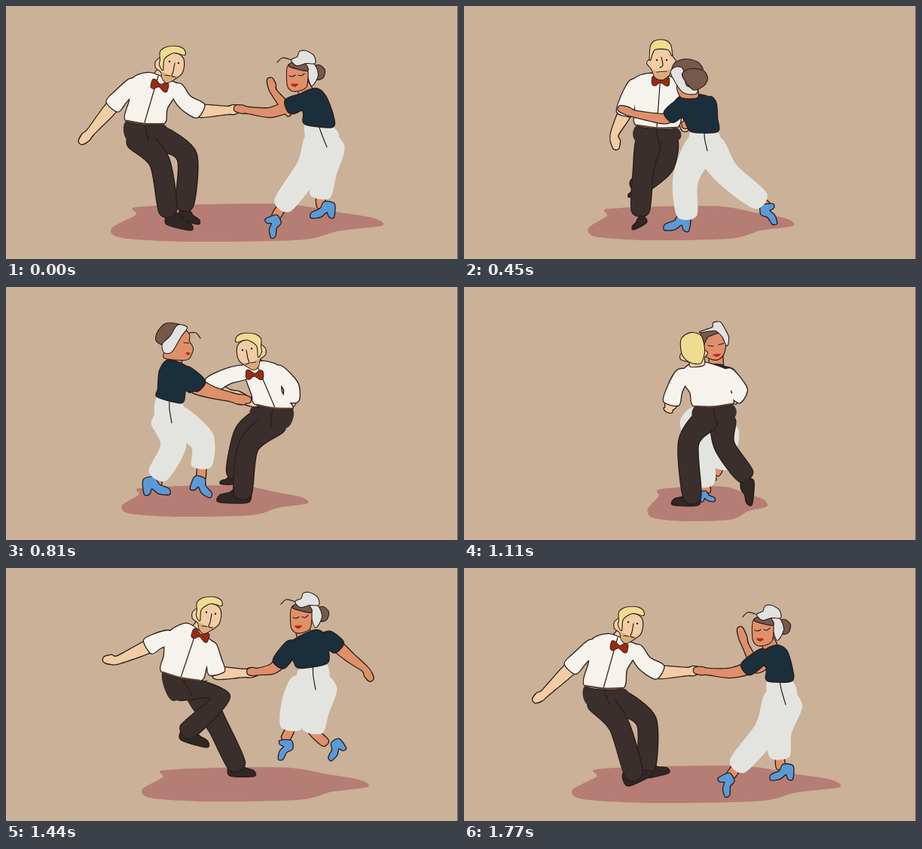
Write an HTML page with a canvas that moves like this. It is 600x337 px and loops after 1.8 s.

```html
<!DOCTYPE html>
<html lang="en">
<head>
<meta charset="utf-8">
<title>Swing dance</title>
<style>
html, body { margin: 0; width: 100%; height: 100%; overflow: hidden; background: #cab198; }
canvas { display: block; width: 600px; height: 337px; }
</style>
</head>
<body>
<canvas id="stage" width="600" height="337"></canvas>
<script>
const ctx = document.getElementById('stage').getContext('2d');
const INK = '#2a1d19', BROWN = '#5a3d2b', FLOOR = '#b67d74', RED = '#9a2b12';
const TONES = { skin: '#f1cca4', tan: '#df906a', blond: '#efdc90', hair: '#75594a', scarf: '#e2e3e0', lips: '#b52a1e', beard: '#d9ac7c' };

// Looks and half widths along the limbs; cuff is the joint where the sleeve ends
const MAN = { skin: TONES.skin, top: '#f6f3ec', pants: '#3a2f2d', shoe: '#312725', edge: 2.6, cuff: 2,
  sleeve: [9, 10, 10], arm: [8, 5, 6, 3], leg: [16, 13, 11], shoeShape: [[0, 0], [0, .5], [.4, .5], [.65, .32], [1, .22], [1.03, 0]] };
const WOMAN = { skin: TONES.tan, top: '#1b2e3c', pants: '#e3e4e0', shoe: '#5a9ad6', edge: 0, cuff: 1,
  sleeve: [9, 9], arm: [7, 6, 4, 5, 3], leg: [20, 17, 13],
  shoeShape: [[0, 0], [-.04, .6], [.4, .7], [.6, .4], [1, .22], [1.02, 0], [.6, .03], [.3, .24], [.2, .02]] };

// Heads around their own centre
const HEADS = {
  side: `skin -13 -12 -6 -17 9 -16 16 -10 17 0 14 10 5 17 -5 22 -11 17 -13 8 -20 2 -20 -6
beard -12 8 0 13 9 13 5 17 -5 22 -10 18
blond -14 -8 -14 -19 -6 -25 8 -26 17 -22 18 -15 4 -18 -9 -10 -11 5 -15 -2
line 5 -4 3 7 1 13 6 15
line -8 12 -1 13
dots -2 -6 10 -4`,
  front: `skin -14 0 -11 -12 1 -17 13 -10 16 -2 20 4 15 12 11 22 2 28 -7 25 -12 14 -18 6
beard -10 15 0 19 13 14 9 23 2 28 -6 25
blond -14 2 -13 -17 -6 -24 6 -24 13 -18 15 -4 10 -12 -8 -12
line 1 -2 3 9 -1 12
line -5 18 8 17
dots -5 2 8 2`,
  back: `skin -14 8 -16 16 -5 20 -3 26 14 24 15 14 19 8 10 2
blond -14 10 -16 -8 -10 -16 0 -19 11 -14 15 5 10 21 -4 20`,
  smile: `hair 22 -10 30 -13 37 -6 34 4 24 5
scarf 12 -16 23 -14 28 0 20 14 14 -2
tan -13 -4 -10 -14 5 -16 14 -8 13 14 5 20 -6 21 -12 14
hair -10 -12 -2 -18 10 -16 14 -6
scarf -7 -20 1 -24 4 -31 12 -32 22 -26 24 -16 12 -16 0 -13
line -26 -17 -19 -23 -7 -20
line -10 1 -6 2 -2 0
line 2 0 6 1 10 -2
lips -8 12 2 12 -3 16`,
  profile: `hair -2 -23 16 -25 27 -13 28 -2 14 4 2 -8
tan -15 -11 -5 -16 14 8 18 20 -4 23 -15 21 -20 8 -15 -2
scarf -12 -20 0 -23 10 -8 20 2 18 13 8 12 -4 -8
line -15 1 -8 0
line -30 -6 -24 -13 -15 -13
lips -17 14 -11 13 -13 17`,
  bun: `tan -16 8 8 16 9 26 -12 25
hair -23 -11 -19 -21 -5 -25 10 -21 16 -10 -8 -4
scarf -25 -6 -20 -14 -10 -12 -5 10 9 14 7 21 -10 18
hair -10 -4 0 -12 17 -10 23 0 18 10 4 15`,
  calm: `tan -16 -10 -6 -17 6 -14 13 -3 11 12 4 20 -5 20 -15 13
hair -19 -14 -6 -20 4 -16 -10 -10 -16 0
scarf -21 -16 -4 -22 -3 -28 6 -29 12 -20 17 -9 15 2 9 -10 0 -18 -12 -17
line -10 2 -3 3
line 4 1 11 -1
lips -4 14 7 13 2 17`
};

// Joints: body runs neck, shoulder, side, waist and back up; arms shoulder to fingertip;
// legs hip, knee, ankle; feet heel, toe; tie and head end with angle or facing
const POSES = [
  { at: 0, floor: [140, 499, 263, 314],
    man: `side
body 190 89 168 97 164 126 160 153 208 157 214 136 230 108 214 98
arm1 170 104 153 120 141 134 113 167 99 182
arm2 226 110 238 128 258 140 294 139 310 137
leg1 174 176 204 208 215 274
leg2 200 174 240 200 237 266
foot1 213 290 244 298
foot2 230 282 254 290
tie 204 106 15
head 219 80 1`,
    woman: `smile
body 390 118 386 126 395 142 397 157 433 161 434 146 424 120 411 110
arm1 392 127 376 135 378 142 356 115 350 97
arm2 396 126 374 134 350 142 322 139 304 136
leg1 416 180 402 216 367 266
leg2 430 184 422 222 417 254
foot1 345 284 352 308
foot2 435 281 406 282
head 386 92 1` },
  { at: 270, floor: [148, 444, 266, 310],
    man: `front
body 220 98 198 104 189 128 184 158 229 165 232 148 244 116 232 109
arm1 196 108 180 124 170 140 165 172 161 194
arm2 242 114 252 130 260 148 286 153 299 150
leg1 210 182 217 216 226 270
leg2 196 178 210 214 183 255
foot1 221 285 241 298
foot2 157 268 186 276
tie 228 117 5
head 237 86 1`,
    woman: `profile
body 374 126 364 136 366 156 372 170 398 175 398 152 402 134 388 122
arm1 366 136 348 158 338 161 312 154 298 148
arm2 392 130 396 134 416 138 432 126 446 114
leg1 386 192 352 216 340 264
leg2 402 190 404 222 402 258
foot1 352 288 332 298
foot2 418 278 402 292
head 360 105 1` },
  { at: 450, floor: [165, 437, 266, 312], lift: 7,
    man: `front
body 246 90 224 100 227 136 230 159 282 162 288 134 288 104 276 95
arm1 228 104 218 124 213 144 200 170 202 190
arm2 284 104 288 118 290 134 292 152 294 166
leg1 245 180 238 218 234 274
leg2 268 180 264 214 228 242
foot1 242 288 226 297
foot2 232 248 220 254
tie 261 100 0
head 261 70 1`,
    woman: `bun
body 292 118 280 130 294 154 302 167 336 167 336 150 333 126 312 118
arm1 292 130 272 148 262 150 228 144 206 136
arm2 326 128 320 140 312 150 298 158 290 158
leg1 314 186 294 232 296 280
leg2 326 188 350 224 394 260
foot1 298 299 267 298
foot2 410 264 415 289
head 300 96 1` },
  { at: 810, floor: [154, 400, 264, 306],
    man: `side
body 322 104 316 112 326 142 333 157 380 162 366 140 364 108 342 99
arm1 318 113 294 119 270 132 296 142 318 148
arm2 360 112 378 132 378 152 340 154 316 152
leg1 358 180 322 212 314 276
leg2 340 178 316 196 304 250
foot1 322 286 284 286
foot2 302 262 286 262
tie 330 117 0
head 324 88 -1`,
    woman: `profile
body 214 98 204 112 202 136 201 146 233 154 238 138 250 116 232 102
arm1 232 114 250 134 270 141 298 148 318 153
arm2 238 114 258 132 276 140 306 147 324 151
leg1 222 174 260 204 260 239
leg2 212 176 222 212 201 252
foot1 245 268 270 280
foot2 184 276 216 276
head 228 74 -1` },
  { at: 1110, floor: [244, 402, 265, 312], manInFront: true,
    man: `back
body 302 102 286 118 300 140 307 159 355 156 354 138 354 114 322 101
arm1 290 116 280 136 275 155 272 162 270 166
arm2 350 116 366 138 358 148 354 150 352 152
leg1 322 176 298 208 303 281
leg2 344 178 346 212 374 252
foot1 311 290 279 290
foot2 384 258 382 288
tie 312 106 0
head 304 80 1`,
    woman: `calm
body 326 104 322 114 320 132 318 150 340 152 350 140 352 116 344 105
arm1 326 112 320 124 318 134 322 146 326 150
arm2 350 114 354 126 350 134 344 140 340 146
leg1 306 176 314 212 320 262
leg2 344 190 346 212 339 240
foot1 314 285 332 285
foot2 322 258 334 257
head 334 76 1` },
  { at: 1440, floor: [181, 480, 265, 311], lift: 14,
    man: `side
body 240 74 214 88 210 116 208 139 257 150 266 132 276 104 266 92
arm1 218 92 202 97 188 105 150 122 130 122
arm2 270 104 276 124 280 140 316 140 334 139
leg1 232 160 284 172 240 218
leg2 256 168 282 212 307 264
foot1 232 228 265 238
foot2 297 276 328 277
tie 258 90 18
head 268 65 1`,
    woman: `smile
body 382 96 376 106 382 124 390 133 425 127 428 112 424 90 410 83
arm1 380 104 362 128 352 135 334 138 321 138
arm2 426 92 442 106 458 120 476 134 485 149
leg1 396 156 382 184 378 214
leg2 420 156 412 190 407 218
foot1 364 230 362 254
foot2 451 240 432 256
head 391 65 1` },
  { at: 1770, floor: [144, 498, 263, 313],
    man: `side
body 192 88 170 96 166 125 161 157 210 160 216 135 232 107 216 97
arm1 172 103 155 119 141 134 108 166 93 177
arm2 228 109 240 127 260 139 296 138 312 136
leg1 178 176 206 210 226 276
leg2 202 176 242 204 242 268
foot1 218 290 248 276
foot2 240 279 270 273
tie 206 105 10
head 220 78 1`,
    woman: `smile
body 402 108 398 118 402 136 403 150 435 150 435 132 428 110 416 103
arm1 404 116 398 128 390 134 374 104 366 80
arm2 398 116 374 135 352 140 324 138 306 136
leg1 418 174 402 216 363 264
leg2 430 178 418 218 419 252
foot1 338 280 347 304
foot2 436 281 408 282
head 396 82 1` }
];
const LOOP = 1800;
const HOLDS = [0, 60, 120, 180, 240, 270, 330, 390, 450, 510, 540, 570, 600, 660, 720, 780, 810, 870, 930, 990,
  1050, 1110, 1170, 1230, 1290, 1350, 1410, 1440, 1470, 1500, 1530, 1560, 1590, 1620, 1650, 1680, 1740, 1770];

const mix = (a, b, k) => a + (b - a) * k;
const mixAll = (a, b, k) => a.map((v, i) => mix(v, b[i], k));
const middle = (a, b) => mixAll(a, b, .5);
const pairs = v => v.flatMap((x, i) => i % 2 ? [] : [[x, v[i + 1]]]);
const rows = text => text.split('\n').map(row => {
  const [name, ...v] = row.split(' ');
  return [name, v.map(Number)];
});

for (const pose of POSES) {
  for (const who of ['man', 'woman']) {
    const [[face], ...joints] = rows(pose[who]);
    pose[who] = { face, joints: Object.fromEntries(joints) };
  }
}

function trace(pts, closed = true) {
  const n = pts.length, at = i => closed ? pts[(i + n) % n] : pts[Math.max(0, Math.min(n - 1, i))];
  const path = new Path2D(), pull = .14;
  path.moveTo(...pts[0]);
  for (let i = 0; i < (closed ? n : n - 1); i++) {
    const [a, b, c, d] = [at(i - 1), at(i), at(i + 1), at(i + 2)];
    path.bezierCurveTo(b[0] + (c[0] - a[0]) * pull, b[1] + (c[1] - a[1]) * pull,
      c[0] - (d[0] - b[0]) * pull, c[1] - (d[1] - b[1]) * pull, c[0], c[1]);
  }
  return path;
}

// Limb outline around a chain of joints, with a rounded start
function tube(pts, widths) {
  const left = [], right = [];
  pts.forEach(([x, y], i) => {
    const a = pts[Math.max(0, i - 1)], b = pts[Math.min(pts.length - 1, i + 1)];
    const d = Math.hypot(b[0] - a[0], b[1] - a[1]) || 1, w = widths[i];
    const u = (b[0] - a[0]) / d * w, v = (b[1] - a[1]) / d * w;
    if (!i) left.push([x - u * .8, y - v * .8]);
    left.push([x - v, y + u]);
    right.unshift([x + v, y - u]);
  });
  return trace([...left, ...right]);
}

// Shapes of one colour share a single outline
function fill(colour, paths, edge = 2.6) {
  if (edge) paths.forEach(p => line(p, edge));
  ctx.fillStyle = colour;
  paths.forEach(p => ctx.fill(p));
}

function line(path, width = 1.2, colour = INK) {
  ctx.lineWidth = width;
  ctx.strokeStyle = colour;
  ctx.stroke(path);
}

function drawShoe(look, [heel, toe], ankle) {
  const u = toe[0] - heel[0], v = toe[1] - heel[1];
  const side = v * (ankle[0] - heel[0]) - u * (ankle[1] - heel[1]) < 0 ? -1 : 1;
  fill(look.shoe, [trace(look.shoeShape.map(([x, y]) => [heel[0] + u * x + v * y * side, heel[1] + v * x - u * y * side]))]);
}

function drawTie([x, y, angle]) {
  const a = angle * Math.PI / 180, c = Math.cos(a), s = Math.sin(a);
  const half = [[-2, 2], [-7, 6], [-11, 4], [-11, -5], [-7, -6], [-1, -2]];
  const bow = [...half, ...half.map(([u, v]) => [-u, -v])];
  fill(RED, [trace(bow.map(([u, v]) => [x + u * c - v * s, y + u * s + v * c]))], 1.6);
}

function drawHead(face, [x, y, facing]) {
  ctx.save();
  ctx.translate(x, y);
  ctx.scale(facing < 0 ? -1 : 1, 1);
  for (const [kind, v] of rows(HEADS[face])) {
    const pts = pairs(v);
    if (kind === 'line') line(trace(pts, false));
    else if (kind === 'dots') pts.forEach(p => line(trace([p, p], false), 2.4));
    else fill(TONES[kind], [trace(pts)], kind === 'lips' || kind === 'beard' ? 0 : 2.2);
  }
  ctx.restore();
}

function drawDancer(look, face, joints) {
  const pts = name => pairs(joints[name]);
  const body = pts('body'), neck = middle(body[0], body[7]), waist = middle(body[3], body[4]);
  const legs = [pts('leg2'), pts('leg1')], feet = [pts('foot2'), pts('foot1')], arms = [pts('arm1'), pts('arm2')];
  const hips = middle(legs[0][0], legs[1][0]), girth = Math.hypot(body[4][0] - body[3][0], body[4][1] - body[3][1]) / 2;
  const isMan = look === MAN, fromFront = face !== 'back';

  legs.forEach((leg, i) => {
    const ankle = leg[2], foot = middle(...feet[i]);
    if (!isMan) fill(look.skin, [tube([ankle, middle(ankle, foot)], [5, 5])]);
    drawShoe(look, feet[i], ankle);
    fill(look.pants, [tube(leg, look.leg)], look.edge);
  });
  fill(look.pants, [trace([body[3], body[4], ...tubeEnd(hips, waist, girth + 1)])], 0);
  line(trace([waist, middle(waist, hips), [hips[0] + 3, hips[1] + 6]], false));

  fill(look.skin, arms.map(arm => {
    const chain = arm.slice(look.cuff), [wrist, tip] = chain.slice(-2);
    return tube([...chain.slice(0, -1), middle(wrist, tip), tip], look.arm);
  }));
  fill(look.skin, [tube([joints.head, [neck[0], neck[1] + 4]], [7, 8])]);
  fill(look.top, [trace(body), ...arms.map(arm => tube(arm.slice(0, look.cuff + 1), look.sleeve))]);
  if (isMan) {
    line(trace([body[3], [waist[0], waist[1] + 2], body[4]], false), 2.4, BROWN);
    if (fromFront) {
      line(trace([neck, middle(neck, waist), waist], false));
      drawTie(joints.tie);
    }
  }
  drawHead(face, joints.head);
}

// Lower edge of the seat, square to the line from waist to hips
function tubeEnd(hips, waist, w) {
  const u = hips[0] - waist[0], v = hips[1] - waist[1], d = Math.hypot(u, v) || 1;
  const x = v / d * w, y = -u / d * w;
  return [[hips[0] + x, hips[1] + y], [hips[0] - x, hips[1] - y]];
}

function drawFloor([left, right, top, bottom]) {
  const edge = [[.09, .1], [.35, .02], [.65, .02], [.83, .22], [.97, .38], [1, .58], [.84, .72], [.7, .95], [.3, 1], [.04, .9], [0, .65], [.09, .3]];
  fill(FLOOR, [trace(edge.map(([u, v]) => [mix(left, right, u), mix(top, bottom, v)]))], 0);
}

function draw(time) {
  const i = POSES.findLastIndex(p => p.at <= time), from = POSES[i], to = POSES[(i + 1) % POSES.length];
  const k = (time - from.at) / ((to.at || LOOP) - from.at), near = k < .5 ? from : to;
  const dance = (look, who) => {
    const joints = {};
    for (const name in from[who].joints) joints[name] = mixAll(from[who].joints[name], to[who].joints[name], k);
    drawDancer(look, near[who].face, joints);
  };
  ctx.fillStyle = '#cab198';
  ctx.fillRect(0, 0, 600, 337);
  ctx.lineCap = ctx.lineJoin = 'round';
  drawFloor(mixAll(from.floor, to.floor, k));
  ctx.save();
  ctx.translate(0, -(from.lift || 0) * Math.sin(Math.PI * k));
  const pair = [[MAN, 'man'], [WOMAN, 'woman']];
  for (const dancer of near.manInFront ? pair.reverse() : pair) dance(...dancer);
  ctx.restore();
  ctx.fillStyle = '#6f6257';
  ctx.fillRect(599, 0, 1, 337);
}

let start, shown;
function tick(now) {
  start ??= now;
  const ms = (now - start) % LOOP, time = HOLDS.findLast(t => t <= ms);
  if (time !== shown) draw(shown = time);
  requestAnimationFrame(tick);
}
draw(shown = 0);
requestAnimationFrame(tick);
</script>
</body>
</html>
```
